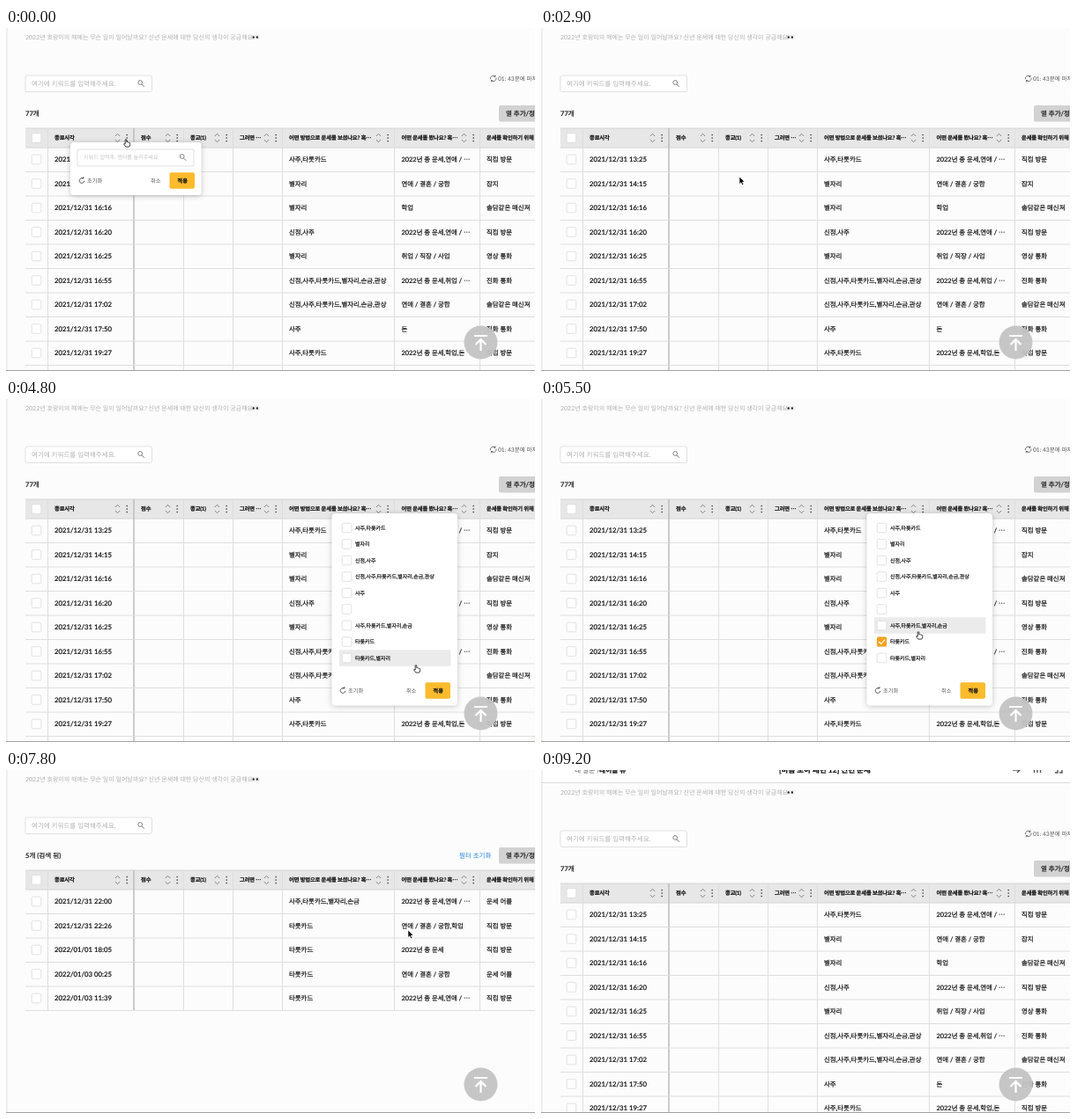
Write an HTML page that moves like this. It is 600 by 390 pixels and loops after 9900 ms.

```html
<!DOCTYPE html>
<html lang="ko">
<head>
<meta charset="utf-8">
<title>설문 응답 테이블</title>
<style>
html, body { margin: 0; width: 100%; height: 100%; overflow: hidden; background: #fcfcfc; }
svg { display: block; width: 600px; height: 390px; }
text {
  font-family: Lato, "Noto Sans CJK KR", "Noto Sans CJK", sans-serif; font-weight: 500;
  fill: #161616; stroke: #161616; stroke-width: .2; white-space: pre; text-rendering: geometricPrecision;
}
.head { font-weight: 700; letter-spacing: -.15px; }
.bold { font-weight: 700; }
.grey { fill: #b0b0b0; font-weight: 400; stroke: none; }
.pale { fill: #c2c2c2; font-weight: 400; stroke: none; }
.soft { fill: #555; font-weight: 400; stroke: none; }
.link { fill: #2484dc; stroke: none; }
.line { stroke: #dedede; stroke-width: 1; fill: none; }
.icon { fill: none; stroke: #777; stroke-width: .9; }
.box { fill: #fff; stroke: #dadada; stroke-width: .8; }
.field.over { stroke: #999; }
.panel { fill: #fff; filter: drop-shadow(0 1px 3px rgba(0, 0, 0, .22)); }
.hidden { display: none; }
</style>
</head>
<body>
<svg viewBox="0 0 600 390" id="stage"></svg>
<script>
const LOOP = 9900, STEP = 100, ROW = 27.5, TOP = 136, ITEM = 18.5;

// Markup helpers; text is placed by its vertical middle
const text = (x, y, s, size, cls = '') =>
  `<text x="${x}" y="${y + size * .36}" font-size="${size}" class="${cls}">${s}</text>`;
const rect = (x, y, w, h, attrs) => `<rect x="${x}" y="${y}" width="${w}" height="${h}" ${attrs}/>`;
const path = (d, attrs = 'class="icon"') => `<path d="${d}" ${attrs}/>`;
const group = (id, body, attrs = '') => `<g id="${id}" ${attrs}>${body}</g>`;
const checkbox = (x, y) => rect(x - 5.3, y - 5.3, 10.6, 10.6, 'rx="1.5" class="box"');
const lens = (x, y) => path(`M${x + .9} ${y + .9}L${x + 3.8} ${y + 3.8}M${x + 1.6} ${y - 1}a2.4 2.4 0 1 1 -4.8 0a2.4 2.4 0 1 1 4.8 0`);
const resetIcon = (x, y) =>
  path(`M${x + 1.6} ${y - 2.2}A2.8 2.8 0 1 0 ${x + 2.8} ${y + .4}M${x - .4} ${y - 2.8}h2.4v-1.6`,
    'class="icon" style="stroke:#444"');

const columns = [
  { x: 55, sort: 126.5, label: '종료시각' },
  { x: 153, sort: 183.5, label: '점수' },
  { x: 209, sort: 239.5, label: '종교(1)' },
  { x: 265, sort: 295.5, label: '그러면 ⋯' },
  { x: 321, sort: 422.5, label: '어떤 방법으로 운세를 보셨나요? 혹⋯' },
  { x: 448.5, sort: 519.5, label: '어떤 운세를 봤나요? 혹⋯' },
  { x: 545, label: '운세를 확인하기 위해 이용한 것은?' }
];
const year = '2022년 총 운세', love = '연애 / 결혼 / 궁합';
const every = '신점,사주,타롯카드,별자리,손금,관상';
const allRows = [
  ['2021/12/31 13:25', '사주,타롯카드', year + ',연애 / ⋯', '직접 방문'],
  ['2021/12/31 14:15', '별자리', love, '잡지'],
  ['2021/12/31 16:16', '별자리', '학업', '솔담같은 매신져'],
  ['2021/12/31 16:20', '신점,사주', year + ',연애 / ⋯', '직접 방문'],
  ['2021/12/31 16:25', '별자리', '취업 / 직장 / 사업', '영상 통화'],
  ['2021/12/31 16:55', every, year + ',취업 / ⋯', '전화 통화'],
  ['2021/12/31 17:02', every, love, '솔담같은 매신져'],
  ['2021/12/31 17:50', '사주', '돈', '전화 통화'],
  ['2021/12/31 19:27', '사주,타롯카드', year + ',학업,돈', '직접 방문']
];
const foundRows = [
  ['2021/12/31 22:00', '사주,타롯카드,별자리,손금', year + ',연애 / ⋯', '운세 어플'],
  ['2021/12/31 22:26', '타롯카드', love + ',학업', '직접 방문'],
  ['2022/01/01 18:05', '타롯카드', year, '직접 방문'],
  ['2022/01/03 00:25', '타롯카드', love, '운세 어플'],
  ['2022/01/03 11:39', '타롯카드', year + ',연애 / ⋯', '직접 방문']
];
const options = ['사주,타롯카드', '별자리', '신점,사주', every, '사주', '',
  '사주,타롯카드,별자리,손금', '타롯카드', '타롯카드,별자리'];
const optionY = i => 146.5 + ITEM * i;

function grid(bottom) {
  const bars = [47.5, 201.5, 257.5, 313.5, 440.5, 537.5].map(x => `M${x} 114V${bottom}`).join('');
  return path(bars, 'class="line"') + path(`M145 114V${bottom}`, 'stroke="#bdbdbd" stroke-width="1.5"');
}
function table(rows, bottom) {
  return grid(bottom) + rows.map((r, i) => {
    const y = TOP + ROW * (i + .5) - .25;
    return checkbox(34.5, y) + text(55, y, r[0], 7.75) + text(321, y, r[1], 7.4) +
      text(448.5, y, r[2], 7.4) + text(545, y, r[3], 7.4) +
      path(`M22 ${TOP + ROW * (i + 1)}H600`, 'class="line"');
  }).join('');
}
function header() {
  const cells = columns.map(c => {
    let s = text(c.x, 125, c.label, 6.3, 'head');
    if (c.sort) {
      const k = c.sort + 10.7;
      s += path(`M${c.sort - 2.7} 123l2.7 -2.7l2.7 2.7M${c.sort - 2.7} 127l2.7 2.7l2.7 -2.7`) +
        [121.5, 125, 128.5].map(y => `<circle cx="${k}" cy="${y}" r=".85" fill="#444"/>`).join('');
    }
    return s;
  }).join('');
  return rect(22, 114, 580, 22, 'fill="#e7e7e7"') +
    path('M22 114H600M22 136H600', 'stroke="#d4d4d4"') + checkbox(34.5, 125) + cells;
}
function footer(left, right, y) {
  return resetIcon(left, y) + text(left + 6, y, '초기화', 6.3, 'soft') + text(right - 50, y, '취소', 6.2, 'soft') +
    rect(right - 28.5, y - 9.3, 28.5, 18.6, 'rx="2" fill="#fbbb2c"') + text(right - 19.5, y, '적용', 6.2, 'bold');
}
function searchPanel() {
  return rect(73, 130, 148.5, 60, 'rx="4" class="panel"') + rect(81, 138, 132, 19, 'rx="1" class="box field"') +
    text(88, 147, '키워드 입력후, 엔터를 눌러주세요', 6.1, 'pale') + lens(200.5, 147) + footer(86, 214, 173.5);
}
function optionPanel() {
  return rect(369.5, 130, 142.5, 218.5, 'rx="4" class="panel"') +
    rect(378, 0, 126.5, ITEM, 'id="hover" fill="#ebebeb"') +
    options.map((s, i) => checkbox(386.5, optionY(i)) + text(396, optionY(i), s, 6)).join('') +
    [6, 7].map(i => group('tick' + i, rect(381, optionY(i) - 5.5, 11, 11, 'rx="1.5" fill="#f5a31f"') +
      path(`M383.2 ${optionY(i)}l2.4 2.5l4.4 -4.9`, 'fill="none" stroke="#fff" stroke-width="1.1"'))).join('') +
    footer(382, 504, 331.5);
}
function topBar() {
  return rect(0, -45, 600, 44.5, 'fill="#fff"') + path('M0 -.5H600', 'stroke="#dcdcdc"') +
    text(38, -15, '내 설문 /', 7.75, 'soft') + text(66, -15, '테이블 뷰', 7.75, 'bold') +
    text(270, -15, '[마음 모아 패턴 12] 신년 운세', 8.5, 'bold') +
    path('M535 -15h8m-3 -3l3 3l-3 3M559.5 -12v-4m3.5 4v-7m3.5 7v-5M583 -12h3v-5m2 5h3v-5',
      'fill="none" stroke="#555" stroke-width="1.4"');
}
const eyes = [281, 285.2].map(x =>
  `<ellipse cx="${x}" cy="10.3" rx="2" ry="2.2" fill="#fff" stroke="#bbb" stroke-width=".4"/>` +
  `<ellipse cx="${x - .3}" cy="10.5" rx="1.1" ry="1.3" fill="#222"/>`).join('');

const page = topBar() +
  text(22, 10.5, '2022년 호랑이의 해에는 무슨 일이 일어날까요? 신년 운세에 대한 당신의 생각이 궁금해요', 7, 'grey') + eyes +
  rect(22, 54, 143.5, 18.5, 'rx="2" class="box"') + text(29, 63, '여기에 키워드를 입력해주세요.', 7.5, 'grey') + lens(153, 63) +
  rect(559, 88, 60, 18.5, 'rx="2" fill="#d2d2d2"') + text(567, 97.2, '열 추가/정렬', 7.5) + header() +
  group('full', text(22, 97, '77개', 7.6) + text(558, 57.5, '01: 43분에 마지막 업데이트', 6.6, 'soft') +
    path('M549.4 58.2a3.3 3.3 0 0 1 5.6 -3m1 1.4a3.3 3.3 0 0 1 -5.6 3m4.6 -6v1.8h-1.8m-2.8 5.9v-1.8h1.8',
      'class="icon" style="stroke:#555;stroke-width:.8"') + table(allRows, 420)) +
  group('found', text(22, 97, '5개 (검색 됨)', 7.6) + text(514, 97, '필터 초기화', 7.5, 'link') + table(foundRows, 273.5)) +
  group('search', searchPanel()) + group('choose', optionPanel());

const upButton = '<circle cx="538.5" cy="357.5" r="19" fill="#c3c3c3" opacity=".94"/>' +
  path('M531 350H546M538.5 367V354.5M532.5 360l6 -6l6 6', 'fill="none" stroke="#fff" stroke-width="2.2"');
const edges = path('M1 0V390', 'stroke="#e4e2da"') + path('M0 389.5H600', 'stroke="#a2a2a2"');
const arrow = path('M0 0V8.4L1.9 6.7L3.2 9.6L4.7 8.9L3.4 6.1H6Z', 'id="arrow" fill="#000" stroke="#fff" stroke-width=".6"');
const hand = path('M-.8 1Q0 0 .8 1V3.8Q1.7 3.2 2.4 4Q3.1 3.5 3.7 4.3Q4.7 4.2 4.7 5.2V6.8Q4.5 8.1 3.7 9.1H0Q-1.5 7.5 -2.5 6Q-2.5 4.9 -.8 6Z',
  'id="hand" fill="#fff" stroke="#111" stroke-width=".8" stroke-linejoin="round"');

document.getElementById('stage').innerHTML =
  group('page', page) + upButton + edges + group('cursor', arrow + hand);

// Cursor tip: time, x, y, and 1 where it rests on something clickable
const trail = [
  [0, 136, 126, 1], [100, 142, 133, 0], [500, 167, 169, 1], [600, 168, 170, 1], [900, 168, 170, 0],
  [1600, 202, 133, 0], [1800, 192, 129, 1], [2000, 194, 128, 1], [2200, 194, 128, 1], [2300, 199, 134, 0],
  [2700, 225, 169, 1], [2900, 225, 169, 0], [3800, 432, 120, 1], [4100, 432, 120, 1], [4200, 435, 128, 0],
  [4800, 465, 302, 0], [5000, 465, 302, 0], [5300, 430, 273, 0], [5400, 430, 273, 0], [5600, 426, 255, 0],
  [5700, 426, 255, 0], [6000, 474, 317, 0], [6400, 472, 314, 0], [6600, 488, 327, 1], [6800, 484, 328, 0],
  [7000, 476, 328, 0], [7200, 456, 231, 0], [7700, 456, 231, 0], [7800, 456, 182, 0], [8000, 532, 97, 1],
  [8300, 532, 97, 0], [8800, 606, 130, 0], [LOOP, 606, 130, 0]
];
const el = id => document.getElementById(id);
const show = (id, on) => el(id).classList.toggle('hidden', !on);
const within = (t, a, b) => t >= a && t < b;
const field = document.querySelector('.field');

function cursorAt(t) {
  const i = trail.findIndex(k => k[0] > t) - 1;
  const a = trail[i], b = trail[i + 1];
  const p = (t - a[0]) / (b[0] - a[0]);
  const e = p * p * (3 - 2 * p);
  return { x: a[1] + (b[1] - a[1]) * e, y: a[2] + (b[2] - a[2]) * e, hot: a[3] === 1 };
}

function draw(t) {
  const { x, y, hot } = cursorAt(t);
  const first = within(t, 0, 900), second = within(t, 2200, 2900);
  const choosing = within(t, 4100, 6800), filtered = within(t, 6800, 8300);

  show('search', first || second);
  el('search').setAttribute('transform', `translate(${second ? 57 : 0} 0)`);
  field.classList.toggle('over', y > 138 && y < 157);

  show('choose', choosing);
  const item = Math.round((y - optionY(0)) / ITEM);
  const over = choosing && x > 378 && x < 504 && item >= 0 && item < options.length;
  show('hover', over);
  el('hover').setAttribute('y', optionY(item) - ITEM / 2);
  show('tick7', t >= 5400);
  show('tick6', t >= 5700);

  show('full', !filtered);
  show('found', filtered);

  const scroll = 15 * Math.min(1, Math.max(0, (t - 9000) / 200));
  el('page').setAttribute('transform', `translate(0 ${scroll})`);

  el('cursor').setAttribute('transform', `translate(${x} ${y})`);
  show('hand', hot || over);
  show('arrow', !hot && !over);
}

const start = performance.now();
function tick() {
  const t = (performance.now() - start) % LOOP;
  draw(Math.floor(t / STEP) * STEP);
  requestAnimationFrame(tick);
}
tick();
</script>
</body>
</html>
```
